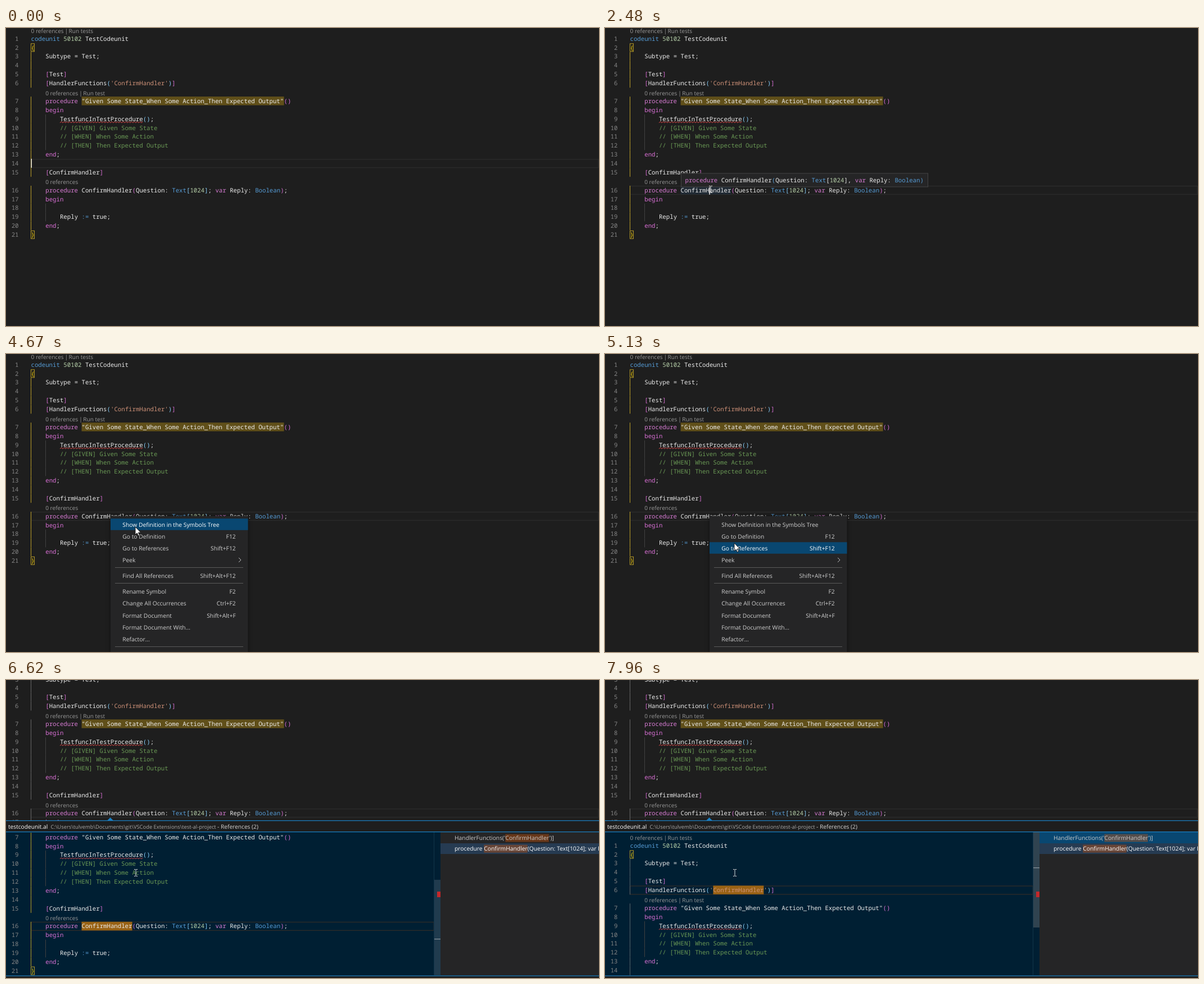
An HTML page with a canvas that plays this animation: 1055 px wide and 531 px high, repeating every 8 s.

```html
<!DOCTYPE html>
<html lang="en">
<head>
<meta charset="utf-8">
<title>Find references in a code editor</title>
<style>
  html, body { margin: 0; height: 100%; overflow: hidden; background: #1e1e1e; }
  canvas { display: block; }
</style>
</head>
<body>
<canvas id="stage" width="1055" height="531"></canvas>
<script>
const ctx = document.getElementById('stage').getContext('2d');
ctx.textRendering = 'geometricPrecision';

const WIDTH = 1055, HEIGHT = 531, DURATION = 8000;
const LINE = 15.88, CHAR = 6.43, LEFT = 44.5;
const MONO = '500 10.717px "Noto Sans Mono", monospace';
const ui = size => `${size}px "Open Sans", sans-serif`;

const PLAIN = '#ececec', GOLD = '#b99d28', BLUE = '#569cd6', KEYWORD = '#d87cd4';
const BRACKETS = ['#ffd700', '#da70d6', '#87cefa'];

// Rows starting with "~" are reference hints between the numbered lines.
const rows = `~Run tests
codeunit 50102 TestCodeunit
{
    Subtype = Test;

    [Test]
    [HandlerFunctions('ConfirmHandler')]
    ~Run test
    procedure "Given Some State_When Some Action_Then Expected Output"()
    begin
        TestfuncInTestProcedure();
        // [GIVEN] Given Some State
        // [WHEN] When Some Action
        // [THEN] Then Expected Output
    end;

    [ConfirmHandler]
    ~
    procedure ConfirmHandler(Question: Text[1024]; var Reply: Boolean);
    begin

        Reply := true;
    end;
}`.split('\n');
const ROW = { handlers: 6, test: 8, call: 10, blank: 15, confirm: 18 };
const isHint = row => row.trim().startsWith('~');
const rowY = row => 19 + (row - 1) * LINE;
const colX = col => LEFT + col * CHAR;

function tokenize(source, nesting) {
  const pattern = /\/\/.*|"[^"]*"|'[^']*'|:=|\w+|[^\s]/g;
  return [...source.matchAll(pattern)].map(({ 0: text, index }) => {
    let color = PLAIN;
    if (text.startsWith('//')) color = '#6a9955';
    else if (text[0] === "'") color = '#ce9178';
    else if (/^(procedure|var)$/.test(text)) color = KEYWORD;
    else if (/^(codeunit|Text|Boolean|:=)$/.test(text)) color = BLUE;
    else if (/^\d/.test(text)) color = '#b5cea8';
    else if (/^([{([]|begin)$/.test(text)) color = BRACKETS[nesting.depth++ % 3];
    else if (/^([})\]]|end)$/.test(text)) color = BRACKETS[--nesting.depth % 3];
    return { text, col: index, color };
  });
}
const nesting = { depth: 0 };
const tokens = rows.map(row => isHint(row) ? [] : tokenize(row, nesting));
const tooltipTokens = tokenize(
  'procedure ConfirmHandler(Question: Text[1024], var Reply: Boolean)', { depth: 2 });
for (const token of tooltipTokens) {
  if (BRACKETS.includes(token.color)) token.color = /[()]/.test(token.text) ? BLUE : PLAIN;
}

function rect(x, y, w, h, color) {
  ctx.fillStyle = color;
  ctx.fillRect(x, y, w, h);
}

function label(text, x, y, color, font = ui(10.3), align = 'left') {
  ctx.font = font;
  ctx.textAlign = align;
  ctx.fillStyle = color;
  ctx.fillText(text, x, y);
}

function outline(x, y, w, h, color, weight = 1) {
  ctx.strokeStyle = color;
  ctx.lineWidth = weight;
  ctx.strokeRect(x, y, w, h);
}

function poly(points, stroke, fill) {
  ctx.beginPath();
  points.forEach(([x, y]) => ctx.lineTo(x, y));
  if (fill) {
    ctx.closePath();
    ctx.fillStyle = fill;
    ctx.fill();
  }
  if (stroke) {
    ctx.strokeStyle = stroke;
    ctx.lineWidth = 0.9;
    ctx.stroke();
  }
}

function clipped(x, y, w, h, paint) {
  ctx.save();
  ctx.beginPath();
  ctx.rect(x, y, w, h);
  ctx.clip();
  paint();
  ctx.restore();
}

const drawTokens = (list, x, baseline) =>
  list.forEach(({ text, col, color }) => label(text, x + col * CHAR, baseline, color, MONO));

function markText(row, col, length, color) {
  rect(colX(col), rowY(row) - 8, length * CHAR, 15.5, color);
}

function drawHint(row, y) {
  const x = colX(row.indexOf('~')), action = row.split('~')[1];
  label('0 references', x, y + 5.4, '#999', ui(10.1));
  if (!action) return;
  label('|', x + 62.7, y + 5.4, '#999', ui(10.1), 'center');
  label(action, x + 67, y + 5.4, '#999', ui(10.1));
}

function drawCode({ shift, active, guide, right = WIDTH, marks = [] }) {
  ctx.save();
  ctx.translate(0, shift);
  outline(LEFT, rowY(active) - 7.3, right - LEFT - 0.8, 14.8, '#2a2a2a', 1.5);
  marks.forEach(mark => markText(...mark));

  let number = 0;
  rows.forEach((row, i) => {
    const y = rowY(i), top = y - LINE / 2;
    if (isHint(row)) return drawHint(row, y);
    label(++number, 22.5, y + 3.7, '#858585', MONO, 'right');
    if (number > 2 && number < 21) rect(44, top, 1, LINE, guide);
    if ((number > 8 && number < 13) || number === 18 || number === 19) {
      rect(70, top, 1, LINE, '#404040');
    }
    if (/^[{}]$/.test(row)) outline(44.5, y - 7, 6, 14, GOLD);
    drawTokens(tokens[i], LEFT, y + 3.7);
  });

  const squiggle = Array.from({ length: 60 }, (_, i) =>
    [colX(8) + i * 2.5, rowY(ROW.call) + (i % 2 ? 5 : 7)]);
  poly(squiggle, '#f14c4c');
  ctx.restore();
}

function drawTooltip(alpha) {
  ctx.globalAlpha = alpha;
  rect(135, 258.5, 440, 25, '#454545');
  rect(136, 259.5, 438, 23, '#252526');
  drawTokens(tooltipTokens, 142.5, 274.7);
  ctx.globalAlpha = 1;
}

const menuItems = [
  [304, 'Show Definition in the Symbols Tree'],
  [325, 'Go to Definition', 'F12'],
  [346, 'Go to References', 'Shift+F12'],
  [367.3, 'Peek'],
  [395, 'Find All References', 'Shift+Alt+F12'],
  [423.5, 'Rename Symbol', 'F2'],
  [444.6, 'Change All Occurrences', 'Ctrl+F2'],
  [466, 'Format Document', 'Shift+Alt+F'],
  [487.3, 'Format Document With...'],
  [508.7, 'Refactor...'],
];

function drawMenu(alpha, hovered) {
  ctx.globalAlpha = alpha;
  ctx.shadowColor = 'rgba(0,0,0,.5)';
  ctx.shadowBlur = 6;
  rect(186, 289, 244.5, 260, '#252526');
  ctx.shadowBlur = 0;
  menuItems.forEach(([y, name, keys], i) => {
    const color = i === hovered ? '#fff' : '#d0d0d0';
    if (i === hovered) rect(186, y - 10.7, 244.5, 20.5, '#094771');
    label(name, 207.3, y + 3.7, color);
    if (keys) label(keys, 408.7, y + 3.7, color, ui(10.3), 'right');
  });
  for (const y of [380, 408, 521]) rect(194, y, 228, 1, '#5a5a5a');
  poly([[414, 363], [418, 367], [414, 371]], '#d0d0d0');
  ctx.globalAlpha = 1;
}

function drawResult(before, after, y, color) {
  const match = 'ConfirmHandler';
  ctx.font = ui(10.3);
  const x = 798 + ctx.measureText(before).width;
  rect(x, y - 7, ctx.measureText(match).width, 14, 'rgba(234,92,0,.333)');
  label(before + match + after, 798, y + 3.7, color);
}

const peekViews = {
  handlers: {
    shift: 276, active: ROW.handlers, guide: '#56626a',
    marks: [[ROW.handlers, 23, 14, '#996214']],
    sliderY: 271, sliderColor: '#304350', caretY: 334,
  },
  confirm: {
    shift: 149.8, active: ROW.confirm, guide: GOLD,
    marks: [[ROW.confirm, 14, 14, '#996214']],
    sliderY: 356, sliderColor: '#203b4e', caretY: 461,
  },
};

function drawPeek(view) {
  poly([[180, 250.5], [185.5, 245], [191, 250.5]], null, '#1b80c4');
  rect(0, 250, WIDTH, 281, '#1e1e1e');
  label('testcodeunit.al', 4, 264.8, '#fff', ui(10.2));
  label('C:\\Users\\tulvemb\\Documents\\git\\VSCode Extensions\\test-al-project', 79.5, 264.6, '#a8a8a8', ui(9.38));
  label('- References (2)', 376, 264.8, '#d4d4d4', ui(10.2));

  rect(0, 271, 773, 255.5, '#001f33');
  clipped(0, 271, 773, 255.5, () => drawCode({ ...view, right: 762 }));
  rect(761, 271, 1, 255, '#12344a');
  rect(762, view.sliderY, 11, 170, view.sliderColor);
  rect(767, 377, 6, 10, '#c4282a');
  rect(762, view.caretY, 11, 1.2, '#8d989f');

  rect(773, 271, 282, 255.5, '#252526');
  if (view === peekViews.handlers) rect(773, 271, 282, 20, '#094771');
  rect(773, 291, 282, 19, '#263b52');
  drawResult("HandlerFunctions('", "')]", 281.6, '#ccc');
  drawResult('procedure ', '(Question: Text[1024]; var Reply: Boolean);', 300.6, '#fff');
  for (const y of [250, 270, 526.6]) rect(0, y, WIDTH, 1.2, '#1b80c4');
}

// Pointer stops: time, x, y. The pointer is sampled about every 77 ms.
const stops = [
  [230, 214.5, 325], [850, 188, 284.5], [1269, 188, 284.5], [1270, 188, 287.5],
  [3819, 188, 287.5], [3820, 186.5, 287], [4283, 186.5, 287], [4670, 230, 308],
  [5130, 230, 337], [5209, 230, 337], [5210, 230, 340.5], [5539, 230, 340.5],
  [5540, 231, 343.5], [DURATION, 231, 343.5],
];

function pointerAt(time) {
  const i = stops.findIndex(stop => stop[0] > time);
  const [t0, x0, y0] = stops[i - 1], [t1, x1, y1] = stops[i];
  const steps = Math.max(1, Math.round((t1 - t0) / 77.4));
  const progress = Math.floor((time - t0) / (t1 - t0) * steps + 1e-6) / steps;
  return [x0 + (x1 - x0) * progress, y0 + (y1 - y0) * progress];
}

function drawPointer(x, y, isArrow) {
  ctx.save();
  ctx.translate(x, y);
  if (isArrow) {
    poly([[0, 0], [0, 14], [3.2, 11], [5.4, 16], [7.5, 15], [5.4, 10.3], [9.6, 10]], '#111', '#fff');
  } else {
    rect(-0.5, -5.5, 1, 11, '#ddd');
    for (const end of [-6.5, 5.5]) {
      rect(-3, end, 2.5, 1, '#ddd');
      rect(0.5, end, 2.5, 1, '#ddd');
    }
  }
  ctx.restore();
}

const between = (time, from, to) => time >= from && time < to;
const CLICK = 540;
const caretTimes = [[CLICK, 1020], [1520, 2000], [2480, 3030], [3490, 3820], [5540, 6070]];

// Value of the last [time, value] pair that has been reached.
const stepAt = (time, pairs) => pairs.reduce((value, [start, next]) => time >= start ? next : value, 0);

function draw(time) {
  const peek = time >= 6620;
  const tooltip = stepAt(time, [[1520, 0.33], [1590, 0.67], [1670, 1], [3820, 0]]);
  const menu = stepAt(time, [[3900, 0.3], [3980, 0.62], [4050, 1], [5540, 0]]);
  const marks = [[ROW.test, 14, 56, '#604f19']];
  if (tooltip) marks.push([ROW.confirm, 14, 14, '#202a34']);

  rect(0, 0, WIDTH, HEIGHT, '#1e1e1e');
  drawCode({
    shift: peek ? -51.9 : 0,
    active: time < CLICK ? ROW.blank : ROW.confirm,
    guide: peek ? '#666' : GOLD,
    marks,
  });

  if (time < CLICK) rect(44.5, 233, 1.5, 16, '#ddd');
  if (caretTimes.some(span => between(time, ...span))) rect(185.3, 281, 1.5, 16, '#ddd');
  if (tooltip) drawTooltip(tooltip);
  if (peek) drawPeek(time >= 7960 ? peekViews.handlers : peekViews.confirm);
  if (time < 230) return;

  const [x, y] = pointerAt(time);
  if (menu) drawMenu(menu, time < 4360 ? -1 : Math.floor((y - 293) / 21.2));
  drawPointer(x, y, between(time, 3820, 5540));
}

function frame() {
  draw(performance.now() % DURATION);
  requestAnimationFrame(frame);
}
frame();
</script>
</body>
</html>
```
